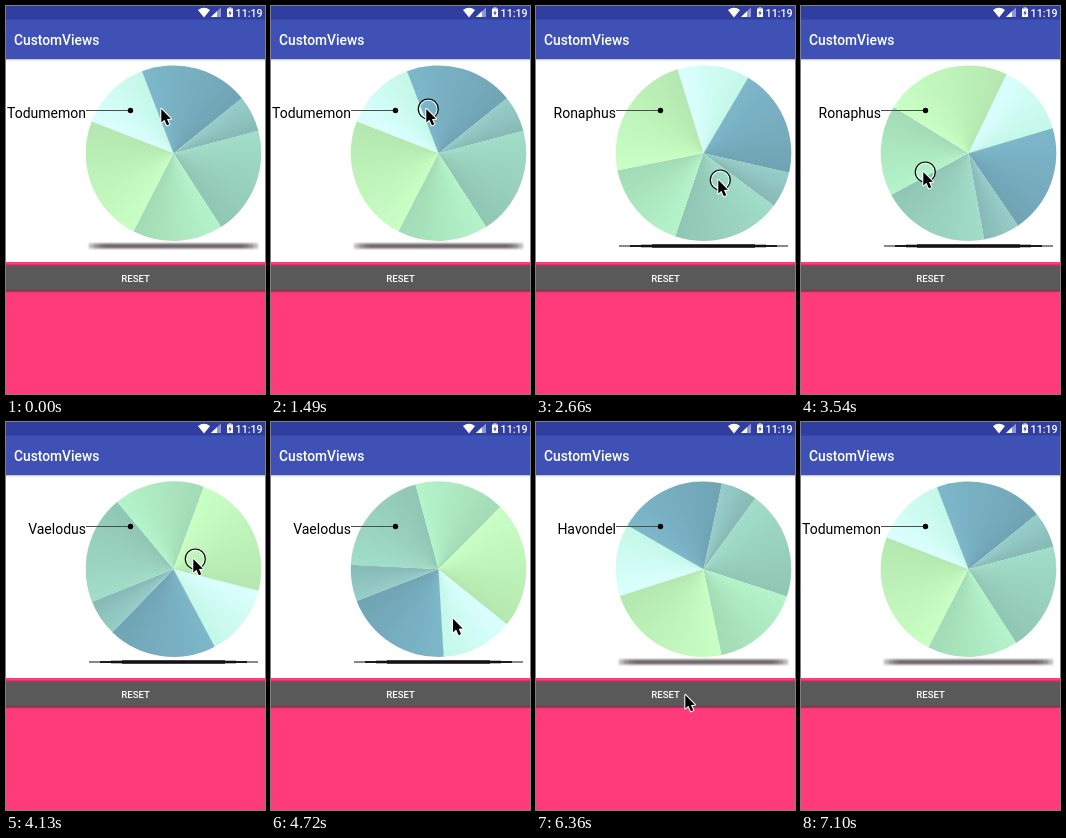
An HTML page with a canvas that plays this animation: 259 px wide and 388 px high, repeating every 8450 ms.

```html
<!DOCTYPE html>
<html lang="en">
<head>
<meta charset="utf-8">
<title>CustomViews</title>
<style>
  html, body { margin: 0; width: 100%; height: 100%; overflow: hidden; background: #fff; }
  canvas { display: block; width: 259px; height: 388px; }
</style>
</head>
<body>
<canvas id="stage" width="259" height="388"></canvas>
<script>
const ctx = document.getElementById('stage').getContext('2d');
const W = 259, H = 388, LOOP = 8450;
const START = 1490, STEP = 147.63, SLACK = 20;
const CX = 167.5, CY = 147.2, R = 87.8, POINTER = 225;
const FONT = 'Roboto, Arial, sans-serif';
const rad = deg => deg * Math.PI / 180;

// Slices in clockwise order; weights add up to 15.
const slices = [
  { name: 'Todumemon', weight: 2, rgb: [196, 248, 232] },
  { name: 'Havondel', weight: 3, rgb: [112, 164, 181] },
  { name: 'Enribolas', weight: 1, rgb: [135, 185, 181] },
  { name: 'Vaelodus', weight: 3, rgb: [144, 198, 180] },
  { name: 'Fellione', weight: 2.5, rgb: [162, 219, 181] },
  { name: 'Ronaphus', weight: 3.5, rgb: [180, 232, 176] }
];
const shade = (rgb, f) => `rgb(${rgb.map(v => Math.min(255, Math.round(v * f)))})`;

const linear = u => u;
const easeOut = u => 1 - (1 - u) ** 3;
const easeInOut = u => (1 - Math.cos(Math.PI * u)) / 2;

// Each move turns the pie and carries the cursor to a point on a bent path.
const moves = [
  { from: 0, to: 7, turn: 51.6, x: 182, y: 173, bend: -8 },
  { from: 9, to: 14, turn: 42.9, x: 122, y: 165, bend: -6 },
  { from: 14, to: 18, turn: 78.5, x: 187, y: 136, bend: -25 },
  { from: 18, to: 20, turn: 20, x: 199, y: 158 },
  { from: 21, to: 27, turn: 11, x: 158, y: 248, ease: easeOut },
  { from: 27, to: 29, x: 149, y: 272 },
  { from: 31, to: 34, turn: 156, x: 149, y: 272, ease: easeInOut },
  { from: 36, to: 37, x: 199, y: 289 }
];

function pose(k) {
  let turn = 201, x = 155, y = 102;
  for (const m of moves) {
    if (k <= m.from) break;
    const u = Math.min(1, (k - m.from) / (m.to - m.from));
    const e = (m.ease || linear)(u);
    const dx = m.x - x, dy = m.y - y;
    const side = (m.bend || 0) * Math.sin(Math.PI * u) / (Math.hypot(dx, dy) || 1);
    turn += (m.turn || 0) * e;
    x += dx * e - dy * side;
    y += dy * e + dx * side;
  }
  return { turn, x, y };
}

function box(color, x, y, w, h) {
  ctx.fillStyle = color;
  ctx.fillRect(x, y, w, h);
}

function fade(y, h, from, to) {
  const g = ctx.createLinearGradient(0, y, 0, y + h);
  g.addColorStop(0, from);
  g.addColorStop(1, to);
  box(g, 0, y, W, h);
}

function text(str, x, y, font, color, align = 'left') {
  ctx.font = font + ' ' + FONT;
  ctx.fillStyle = color;
  ctx.textAlign = align;
  ctx.fillText(str, x, y);
}

function circle(x, y, r) {
  ctx.beginPath();
  ctx.arc(x, y, r, 0, 2 * Math.PI);
}

function paint(path, color) {
  ctx.fillStyle = color;
  ctx.fill(new Path2D(path));
}

function statusIcons() {
  paint('M198 11.5L192 4Q198 -.5 204 4Z', '#fff');
  paint('M205 11H215V1.5Z', '#8e97cf');
  paint('M205 11H211V5.3Z', '#fff');
  box('#fff', 221, 2.5, 6, 8.5);
  box('#fff', 222.5, 1.5, 3, 1);
  paint('M224.6 4L222.3 7.5H223.8L223.4 10L225.7 6.5H224.2Z', '#303f9f');
}

function chrome() {
  box('#fff', 0, 0, W, H);
  box('#3f51b5', 0, 13, W, 40);
  box('#303f9f', 0, 0, W, 13.5);
  fade(53, 2, 'rgba(0,0,0,.28)', 'rgba(0,0,0,0)');
  statusIcons();
  text('11:19', 256.5, 10.5, '500 10.6px', '#fff', 'right');
  text('CustomViews', 8, 39, '500 13.8px', '#fff');

  box('#ff3b7c', 0, 256, W, H - 256);
  fade(258, 2, 'rgba(60,40,50,.1)', 'rgba(60,40,50,.5)');
  box('#5a595a', 0, 260, W, 24);
  fade(284, 3, 'rgba(60,40,50,.75)', 'rgba(60,40,50,0)');
  text('RESET', 129.5, 276, '500 9.6px', '#fff', 'center');
}

// Stacked bars, shorter and thicker towards the middle.
function shadow(sharp) {
  ctx.save();
  if (!sharp) ctx.filter = 'blur(0.9px)';
  for (let i = 0; i < 4; i++) {
    const half = 84.5 - (sharp ? 11 : 5) * i;
    const h = sharp ? 1 + i * 0.8 : 5.4 - i * 1.1;
    box(sharp ? '#151015' : 'rgba(70,60,65,.36)', CX - half, 240 - h / 2, 2 * half, h);
  }
  ctx.restore();
}

// Draws the slices and returns the name under the pointer.
function pie(turn) {
  let a = turn, current = '';
  for (const { name, weight, rgb } of slices) {
    const sweep = weight * 24;
    const g = ctx.createConicGradient(rad(a % 360), CX, CY);
    g.addColorStop(0, shade(rgb, 1.115));
    g.addColorStop(sweep / 360, shade(rgb, 1));
    ctx.beginPath();
    ctx.moveTo(CX, CY);
    ctx.arc(CX, CY, R, rad(a), rad(a + sweep + 0.2));
    ctx.fillStyle = g;
    ctx.fill();
    if ((POINTER - a + 1080) % 360 < sweep) current = name;
    a += sweep;
  }
  return current;
}

function label(name) {
  text(name, 80, 112, '14px', '#000', 'right');
  box('#4a4f4d', 80, 104, 44, 1);
  circle(124.5, 104.5, 2.7);
  ctx.fillStyle = '#000';
  ctx.fill();
}

function ring(x, y, r, width, color) {
  circle(x, y, r);
  ctx.lineWidth = width;
  ctx.strokeStyle = color;
  ctx.stroke();
}

const arrow = new Path2D('M0 0V13.5L3.1 10.8L5.6 16.4L8 15.3L5.6 10L9.6 9.8Z');

function cursor(x, y, pressed) {
  if (pressed) {
    ring(x + 2.3, y + 1, 8.9, 1.3, 'rgba(255,255,255,.8)');
    ring(x + 2.3, y + 1, 10, 1.2, '#000');
  }
  ctx.save();
  ctx.translate(x + 0.3, y + 0.9);
  ctx.lineJoin = 'round';
  ctx.lineWidth = 2;
  ctx.strokeStyle = '#fff';
  ctx.stroke(arrow);
  ctx.fillStyle = '#000';
  ctx.fill(arrow);
  ctx.restore();
}

function draw(t) {
  // The screen refreshes in even steps while anything moves.
  const k = Math.floor((t - START + SLACK) / STEP);
  const { turn, x, y } = pose(k);
  const dragging = k >= 0 && k < 22, tapping = k === 31 || k === 32;
  chrome();
  shadow(k >= 1 && k < 25);
  label(pie(turn));
  if (k < 38) cursor(x, y, dragging || tapping);
}

const begin = performance.now();
function tick() {
  draw((performance.now() - begin) % LOOP);
  requestAnimationFrame(tick);
}
tick();
</script>
</body>
</html>
```
